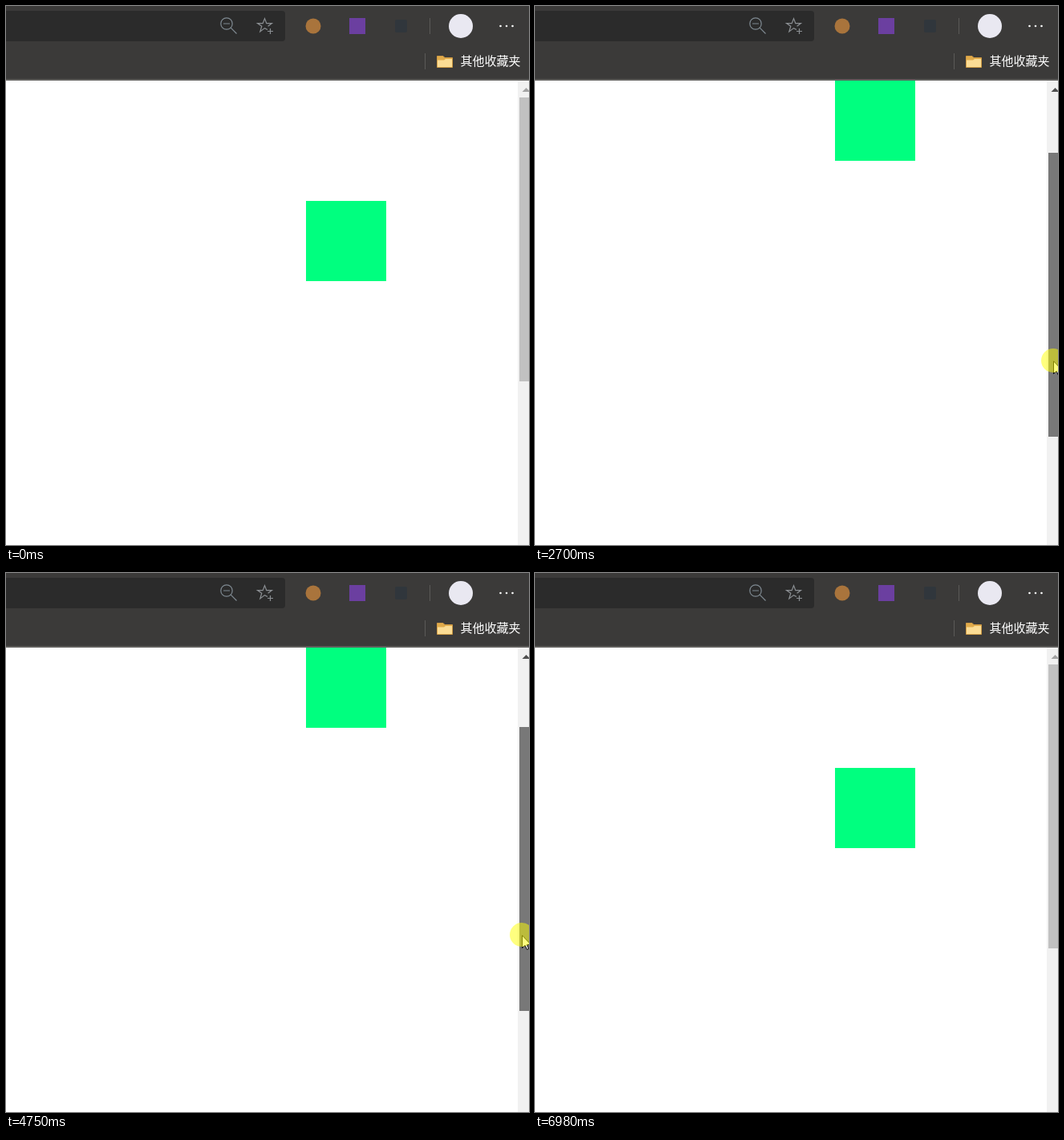
Write an HTML page that moves like this. It is 652 by 672 pixels and loops after 7.59 s.

```html
<!DOCTYPE html>
<html lang="zh">
<head>
<meta charset="utf-8">
<title>Sticky scroll</title>
<style>
html, body { margin: 0; width: 100%; height: 100%; overflow: hidden; background: #fff; }
svg { display: block; width: 652px; height: 672px; }
text { font: 15px "Noto Sans CJK SC", "Noto Sans CJK", "Noto Sans", sans-serif; }
</style>
</head>
<body>
<svg viewBox="0 0 652 672" xmlns="http://www.w3.org/2000/svg">
  <rect width="652" height="672" fill="#fff"/>
  <rect id="box" x="374" y="243" width="100" height="100" fill="#00ff7f"/>

  <!-- scrollbar -->
  <rect x="638" y="93" width="14" height="579" fill="#f1f1f1"/>
  <path id="up" d="M643.5 107L648.5 102L653.5 107Z" fill="#a3a3a3"/>
  <rect id="thumb" x="640" y="114" width="12" height="354" fill="#c1c1c1"/>

  <!-- browser toolbar -->
  <rect width="652" height="93" fill="#3b3a39"/>
  <rect y="91" width="652" height="2" fill="#5e5d5b"/>
  <rect x="-8" y="6" width="356" height="38" rx="4" fill="#2b2b2b"/>
  <g fill="none" stroke="#7f8a92" stroke-width="1.2">
    <circle cx="275" cy="22" r="7.2"/>
    <path d="M271 22H279M280.2 27.2L287.5 34.5"/>
  </g>
  <g fill="none" stroke="#8b8f93" stroke-width="1.2">
    <path d="M326 29.5L322.5 27.6L316.8 32L318.8 25.2L313.6 21.6H320.2L322.5 15.6L324.8 21.6H331.4L326.6 25.2"/>
    <path d="M329.5 28V35M326 31.5H333"/>
  </g>
  <circle cx="383" cy="25" r="9.5" fill="#a9743c"/>
  <rect x="428" y="15" width="20" height="20" fill="#6b3fa0"/>
  <rect x="485" y="17" width="15" height="16" rx="2" fill="#30363c"/>
  <path d="M528.5 15V35M522.5 59V79" stroke="#5b5a58"/>
  <circle cx="567" cy="25" r="15" fill="#e9e8f1"/>
  <path d="M616.5 25H632" stroke="#fff" stroke-width="2.6" stroke-linecap="round" stroke-dasharray="0 7.5"/>
  <path d="M537.5 62.5H545L547 64.5H556.5V76.5H537.5Z" fill="#e0aa4a" stroke="#cf9b45"/>
  <path d="M538 67.5H546L548 66H556V76H538Z" fill="#fbdc94"/>
  <text x="566.5" y="74" fill="#fff">其他收藏夹</text>

  <g id="pointer">
    <path d="M.5 .8V16.5L4.1 13.1L6.4 18.4L8.6 17.5L6.4 12.3H11.4Z" fill="#fff" stroke="#000"/>
    <circle id="glow" r="15" fill="#ff0" fill-opacity=".5"/>
  </g>
</svg>
<script>
const LOOP = 7590, STEP = 47;
const PRESS = 1370, GRAB = 1420, RELEASE = 6100;
const GRIP_Y = 373, THUMB_TOP = 114, THUMB_END = 468;
const SCROLL_RATIO = 30 / 11, STICK_AT = 150;

// Pointer moves; a power above 1 slows towards the end, below 1 speeds up
const entry = { x: 580, y: 763 };
const moves = [
  { from: 300, to: 530, x: 638, y: 405, power: 2 },
  { from: 680, to: 1040, x: 649, y: 373, power: 1 },
  { from: GRAB, to: 1540, x: 648, y: 382, power: 1 },
  { from: 1720, to: 2470, x: 646, y: 429, power: 1 },
  { from: 2520, to: 3910, x: 645, y: 518, power: 1.08 },
  { from: 4190, to: 4940, x: 642, y: 437, power: 1.45 },
  { from: 4990, to: 5850, x: 636, y: 348, power: 1 },
  { from: 6340, to: 6980, x: 602, y: 680, power: 0.6 }
];

const el = id => document.getElementById(id);
const [box, up, thumb, pointer, glow] = ["box", "up", "thumb", "pointer", "glow"].map(el);

function progress({ from, to, power }, t) {
  if (t < from) return 0;
  if (t >= to) return 1;
  const done = (Math.floor((t - from) / STEP) + 1) * STEP;
  return 1 - (1 - Math.min(1, done / (to - from + STEP))) ** power;
}

function pointerAt(t) {
  let { x, y } = entry;
  for (const move of moves) {
    const p = progress(move, t);
    x += (move.x - x) * p;
    y += (move.y - y) * p;
  }
  return [Math.round(x), Math.round(y)];
}

function draw(t) {
  const [x, y] = pointerAt(t);
  const dragging = t >= GRAB && t < RELEASE;
  const hover = x >= 638 && y < THUMB_END;
  const offset = dragging ? Math.max(0, y - GRIP_Y) : 0;

  pointer.setAttribute("transform", `translate(${x} ${y})`);
  glow.setAttribute("visibility", t >= PRESS && t < RELEASE ? "visible" : "hidden");
  thumb.setAttribute("y", THUMB_TOP + offset);
  thumb.setAttribute("fill", dragging ? "#787878" : hover ? "#a8a8a8" : "#c1c1c1");
  up.setAttribute("fill", offset ? "#505050" : "#a3a3a3");
  box.setAttribute("y", Math.round(243 - Math.min(STICK_AT, offset * SCROLL_RATIO)));
}

const began = performance.now();
function tick() {
  draw((performance.now() - began) % LOOP);
  requestAnimationFrame(tick);
}
tick();
</script>
</body>
</html>
```
